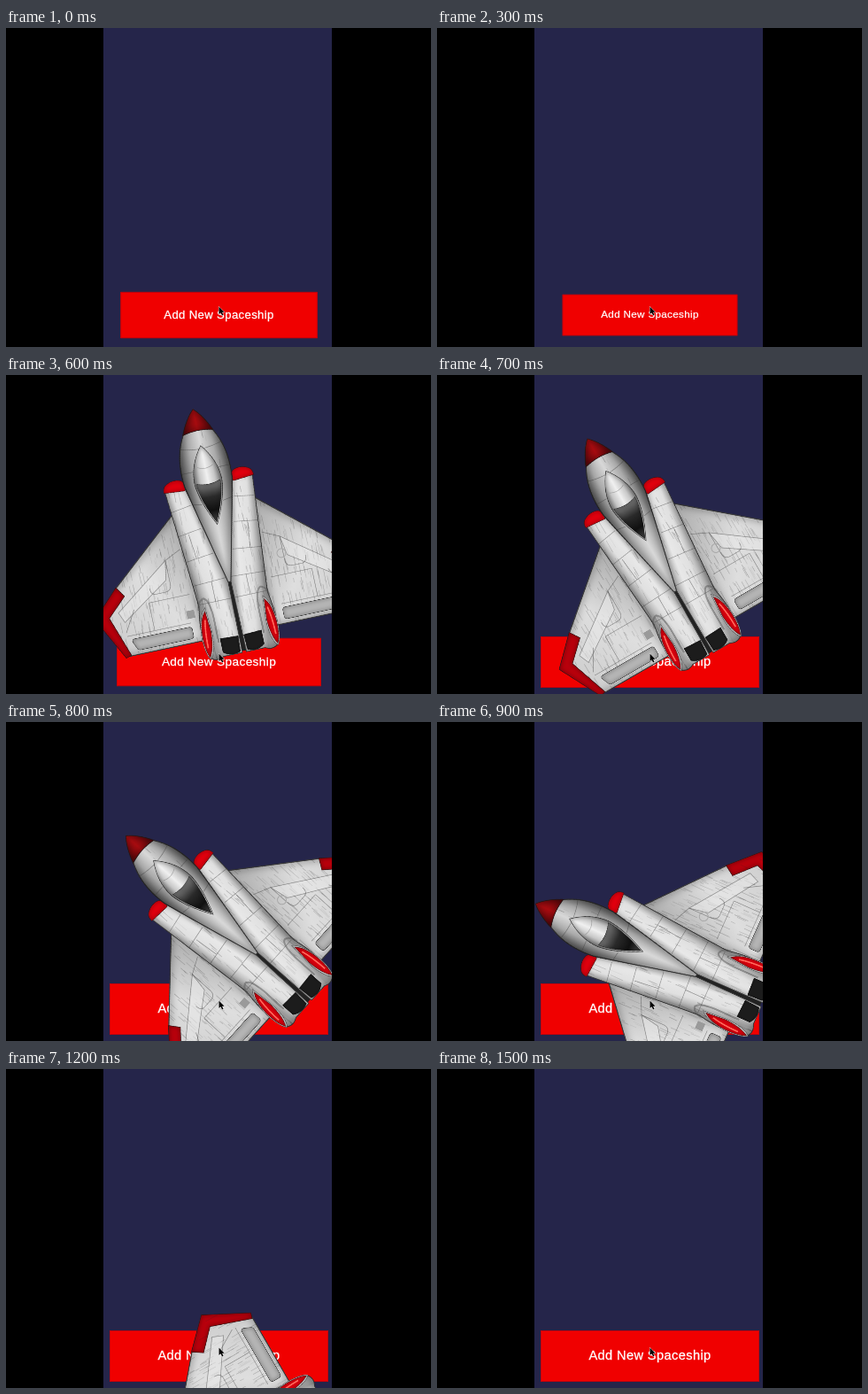
Animation, 480 px wide and 360 px high, one loop 1600 ms. Source, as an HTML page with a canvas:

```html
<!DOCTYPE html>
<html lang="en">
<head>
<meta charset="utf-8">
<title>Add New Spaceship</title>
<style>
  html, body { margin: 0; width: 100%; height: 100%; overflow: hidden; background: #000; }
  canvas { display: block; }
</style>
</head>
<body>
<canvas id="stage" width="480" height="360"></canvas>
<script>
const LOOP = 1600, STEP = 100;
const ctx = document.getElementById('stage').getContext('2d');
const RED = '#b8000c';

let seed = 7;
const random = () => (seed = (seed * 16807) % 2147483647) / 2147483647;

function gradient(g, x0, y0, x1, y1, ...colors) {
  const fill = g.createLinearGradient(x0, y0, x1, y1);
  colors.forEach((c, i) => fill.addColorStop(i / (colors.length - 1), c));
  return fill;
}

// A filled shape with a soft dark rim and optional weathering streaks.
function part(g, d, fill, rim = 6, streaks = 0) {
  const path = new Path2D(d);
  g.save();
  g.clip(path);
  g.fillStyle = fill;
  g.fill(path);
  g.lineWidth = 0.8;
  for (let i = 0; i < streaks; i++) {
    const x = random() * 160, y = random() * 280 - 140;
    g.strokeStyle = `rgba(40,40,40,${0.04 + random() * 0.2})`;
    g.beginPath();
    g.moveTo(x, y);
    g.lineTo(x + random() - 0.5, y + 4 + random() * 14);
    g.stroke();
  }
  g.shadowColor = '#000';
  g.shadowBlur = rim * 2;
  g.strokeStyle = 'rgba(25,25,25,.8)';
  g.lineWidth = rim / 4;
  g.stroke(path);
  g.restore();
}

function line(g, d, color = 'rgba(50,50,50,.4)', width = 0.8) {
  g.strokeStyle = color;
  g.lineWidth = width;
  g.stroke(new Path2D(d));
}

function drawWing(g) {
  part(g, 'M38-36L47-31L130 40L158 68L132 117L40 117Z',
    gradient(g, 40, 0, 150, 60, '#b0b0b0', '#dedede', '#d0d0d0'), 9, 600);
  g.fillStyle = 'rgba(235,235,235,.45)';
  g.fill(new Path2D('M66 19L130 66L125 78L70 41Z'));
  line(g, 'M66 19L130 66L125 78L70 41Z');
  line(g, 'M47 10L66 19V46Q66 54 74 54H84Q90 54 90 46M47 62H94M94 62V94M52 94H126M112 66L126 90');
  part(g, 'M56 98H118Q122 98 121 102L118 109Q117 112 113 112H56Q52 112 52 108V102Q52 98 56 98Z', '#b4b4b4', 4);
  part(g, 'M127 37L158 68L132 118L125 116L141 70L119 49Z', RED, 5, 60);
}

function drawEngine(g) {
  part(g, 'M28-60L51-58L43 40L40 78Q47 112 40 137Q33 144 24 139H2L1 50Z',
    gradient(g, 8, 0, 48, 6, '#999', '#e8e8e8', '#e0e0e0', '#999'), 7, 450);
  line(g, 'M25-36L49-32M19-8L46-4M11 22L44 26M3 52L42 54M2 76H38M34-4L31 24M20 53V76');
  line(g, 'M26 122V92Q27 72 33 70Q40 72 41 82', 'rgba(90,90,90,.5)', 2);
  part(g, 'M27-55Q26-64 31-66Q40-69 48-64Q52-62 52-55L28-53Z', '#e0000e', 4);
  part(g, 'M3 119L24 118V134Q16 141 4 137Z', '#1c1c1c', 2);
  part(g, 'M33 80Q42 88 44 112Q44 132 39 139Q31 132 31 108Z', '#d0d0d0', 3);
  part(g, 'M34 84Q42 92 43 113Q43 130 39 137Q33 128 32 108Z', '#d8000e', 3);
  line(g, 'M36 94Q39 108 39 126', '#ff6a5c', 1.6);
}

function mirrored(g, draw) {
  for (const side of [1, -1]) {
    g.save();
    g.scale(side, 1);
    draw(g);
    g.restore();
  }
}

function makeShip() {
  const sheet = document.createElement('canvas');
  sheet.width = sheet.height = 680;
  const g = sheet.getContext('2d');
  g.setTransform(2, 0, 0, 2, 340, 340);

  mirrored(g, drawWing);
  g.fillStyle = '#9a9a9a';
  g.fillRect(-55, 80, 9, 9);
  g.strokeStyle = '#aaa';
  g.lineWidth = 1;
  g.beginPath();
  g.arc(64, 38, 5, 0, 7);
  g.stroke();

  g.fillStyle = '#222';
  g.fillRect(-4, 45, 8, 92);
  mirrored(g, drawEngine);
  const hull = 'M0-142C8-135 15-122 18-114C27-98 30-80 28-58L22-30L2 58H-2L-22-30L-28-58C-30-80-27-98-18-114C-15-122-8-135 0-142Z';
  part(g, hull, gradient(g, -28, 0, 28, 0, '#555', '#aaa', '#d8d8d8', '#aaa', '#555'), 9, 150);
  line(g, 'M-25-100Q0-92 25-100M-28-72H-15M15-72H28M-24-36L-12-34M12-34L24-36');
  part(g, 'M0-142C8-135 15-122 18-114Q0-119-18-114C-15-122-8-135 0-142Z',
    gradient(g, -18, 0, 18, 0, '#50060a', '#a80c10', '#50060a'), 7);

  part(g, 'M0-100Q16-80 16-58Q15-38 0-8Q-15-38-16-58Q-16-80 0-100Z',
    gradient(g, -16, 0, 16, 0, '#777', '#c8c8c8', '#f0f0f0', '#c8c8c8', '#777'), 5);
  part(g, 'M-14-58Q0-53 14-58Q13-38 0-11Q-13-38-14-58Z',
    gradient(g, 0, -56, 0, -10, '#777', '#2a2a2a', '#111', '#555'), 4);
  line(g, 'M-9-76Q0-71 9-76', 'rgba(90,90,90,.35)');
  return sheet;
}

const ship = makeShip();
const cursor = new Path2D('M0 0V8.5L2 6.8L3.6 10L5 9.3L3.5 6.3H6.2Z');

// Linear press to 80 %, hold, then linear release.
function buttonScale(t) {
  if (t < 100) return 0.9 - t / 1000;
  if (t > 1500) return 1 - (t - 1500) / 1000;
  return Math.min(1, 0.8 + Math.max(0, t - 465) / 1000);
}

function drawButton(t) {
  const scale = buttonScale(t);
  ctx.save();
  ctx.translate(240.5, 324);
  ctx.scale(scale, scale);
  ctx.fillStyle = '#f00000';
  ctx.fillRect(-123.5, -29, 247, 58);
  ctx.strokeStyle = '#c4000a';
  ctx.strokeRect(-123, -28.5, 246, 57);
  ctx.fillStyle = '#fff';
  ctx.font = '14.6px "Liberation Sans", Arial, sans-serif';
  ctx.letterSpacing = '0.4px';
  ctx.textAlign = 'center';
  ctx.fillText('Add New Spaceship', 0, 4);
  ctx.strokeStyle = '#fff';
  ctx.lineWidth = 0.3;
  ctx.strokeText('Add New Spaceship', 0, 4);
  ctx.restore();
}

// Free fall with a constant spin.
function drawShip(t) {
  if (t < 510) return;
  const fall = (t - 493) / 1000;
  ctx.save();
  ctx.translate(240.5, 170.7 + 555 * fall * fall);
  ctx.rotate((-12 - (t - 600) * 0.18) * Math.PI / 180);
  ctx.drawImage(ship, -170, -170, 340, 340);
  ctx.restore();
}

function drawCursor() {
  ctx.save();
  ctx.translate(240.5, 314.5);
  ctx.lineWidth = 1;
  ctx.strokeStyle = 'rgba(255,255,255,.8)';
  ctx.stroke(cursor);
  ctx.fillStyle = '#000';
  ctx.fill(cursor);
  ctx.restore();
}

function render(now) {
  const t = Math.floor((now % LOOP) / STEP) * STEP;
  ctx.fillStyle = '#000';
  ctx.fillRect(0, 0, 480, 360);
  ctx.save();
  ctx.beginPath();
  ctx.rect(110, 0, 258, 360);
  ctx.clip();
  ctx.fillStyle = '#25254a';
  ctx.fillRect(110, 0, 258, 360);
  drawButton(t);
  drawShip(t);
  drawCursor();
  ctx.restore();
  requestAnimationFrame(render);
}
requestAnimationFrame(render);
</script>
</body>
</html>
```
